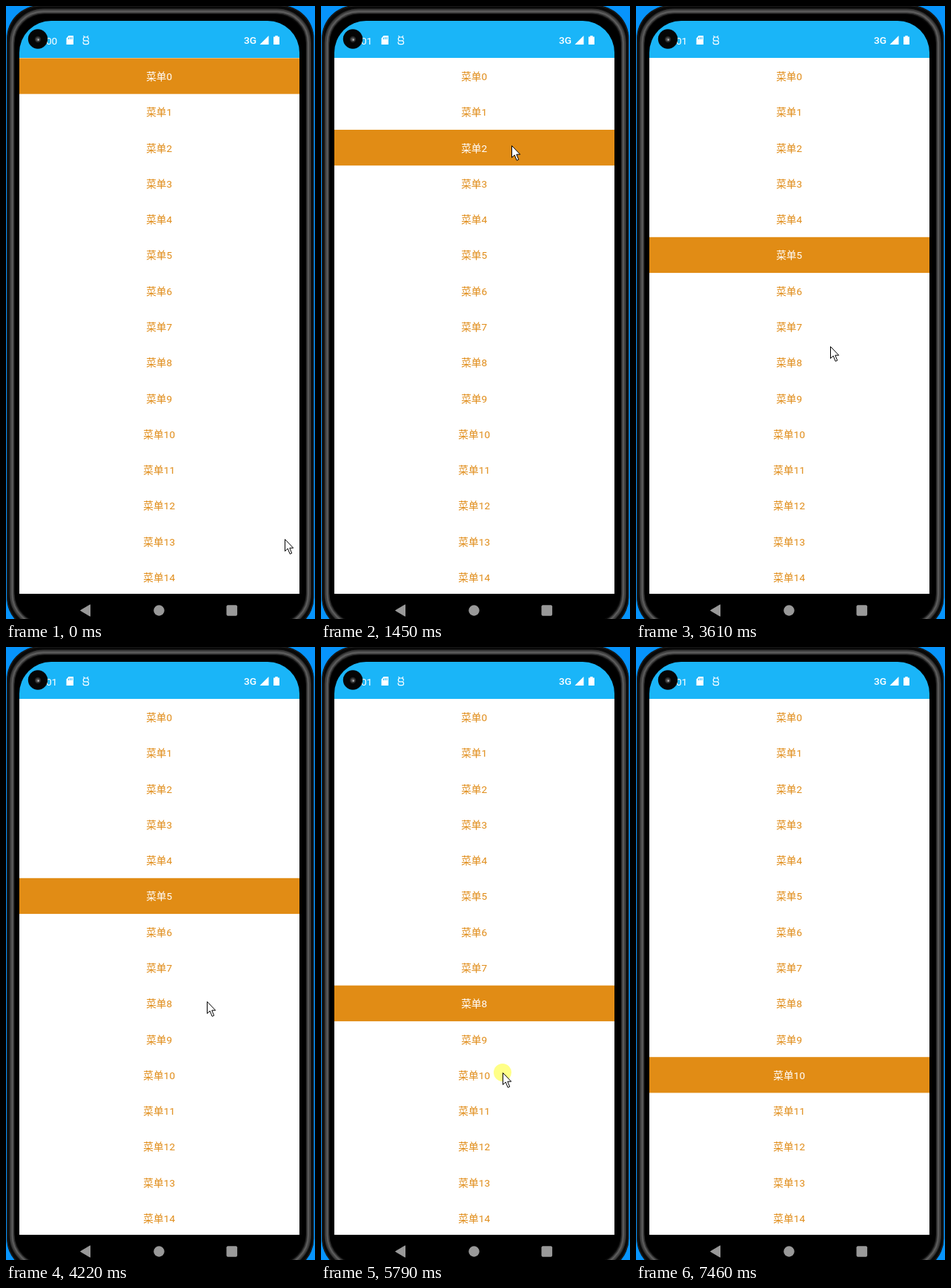
Write an HTML page that moves like this. It is 417 by 827 pixels and loops after 8.12 s.

```html
<!DOCTYPE html>
<html lang="zh">
<head>
<meta charset="utf-8">
<title>菜单</title>
<style>
  html, body { margin: 0; width: 100%; height: 100%; overflow: hidden; background: #0794fc; }
  svg { display: block; width: 417px; height: 827px; }
  text { font: 13.7px Roboto, "Noto Sans CJK SC", "Noto Sans CJK", sans-serif; }
  .row text { fill: #e08c18; text-anchor: middle; }
  .row rect { fill: none; }
  .row.on rect { fill: #e18c15; }
  .row.on text { fill: #fff; }
</style>
</head>
<body>
<svg viewBox="0 0 417 827">
  <defs>
    <clipPath id="screen"><rect x="18" y="20" width="378" height="840" rx="43"/></clipPath>
    <clipPath id="list"><rect x="18" y="70" width="378" height="723"/></clipPath>
  </defs>

  <g id="bezel" fill="none">
    <rect x="1" y="-1" width="414.5" height="844" rx="45" fill="#080808"/>
    <rect x="2" y="0" width="412.5" height="842" rx="44" stroke="#242424"/>
    <rect x="8" y="7" width="400.5" height="829" rx="43" stroke="#2b2b2b" stroke-width="7"/>
    <rect x="8" y="7" width="400.5" height="829" rx="43" stroke="#434343" stroke-width="4.5"/>
    <rect x="8.5" y="7.5" width="399.5" height="828" rx="42" stroke="#5d5d5d" stroke-width="1.8"/>
    <rect x="11.5" y="11" width="393" height="821" rx="42" fill="#000"/>
  </g>

  <g clip-path="url(#screen)">
    <rect x="18" y="20" width="378" height="50.3" fill="#1ab5f8"/>
    <rect x="18" y="70" width="378" height="723" fill="#fff"/>
  </g>

  <g id="status" fill="#fff">
    <text id="clock" x="69.3" y="51.5" text-anchor="end"></text>
    <path d="M84.5 40H91V52H81.5V43.5Z"/>
    <path d="M84.5 42.5v2.5M86.7 42v3M89 42v3" stroke="#1ab5f8"/>
    <path d="M104.5 40l1.5 2M111 40l-1.5 2M111.3 45.5v-1q0-2.5-2.5-2.5h-2q-2.5 0-2.5 2.5t2.5 2.5h2.3q2.5 0 2.5 2.3t-2.5 2.3h-2.5q-2.5 0-2.5-2.3v-1M104.3 46.8h7"
          fill="none" stroke="#fff" stroke-width="1.2"/>
    <text x="321" y="51" font-weight="500" style="font-weight:500">3G</text>
    <path d="M354.5 40V52H342.5Z"/>
    <path d="M363.3 40h3.4v1.4h2.3V52h-8V41.4h2.3Z"/>
  </g>

  <g id="camera">
    <circle cx="43" cy="44.5" r="13.2" fill="#050505"/>
    <circle cx="43" cy="45" r="4.2" fill="#252525"/>
    <circle cx="43" cy="45" r="2.6" fill="#555"/>
    <circle cx="43.6" cy="45.6" r="1.1" fill="#c4c4c4"/>
  </g>

  <g id="rows" clip-path="url(#list)"></g>

  <g id="nav" fill="#999">
    <path d="M100.5 815.5L113.5 807.8V823.2Z" stroke="#999" stroke-linejoin="round"/>
    <circle cx="206.5" cy="815.5" r="7.2"/>
    <rect x="297.5" y="808.2" width="14.6" height="14.6" rx="2"/>
  </g>

  <g id="pointer">
    <circle id="press" r="12" fill="#ff0" fill-opacity=".47"/>
    <path d="M.5.5V16.5L4.2 13L7.2 20.3L9.7 19.2L6.8 12.2H11.7Z" fill="#fff" stroke="#000"/>
  </g>
</svg>
<script>
const LOOP = 8120, STEP = 70, PITCH = 48.28;
const $ = id => document.getElementById(id);

// Pointer waypoints: [ms, x, y]
const path = [
  [0, 376, 719], [70, 330, 589], [170, 330, 589], [1040, 257, 188],
  [1510, 257, 188], [1980, 266, 266], [2710, 248, 332],
  [3190, 248, 332], [3610, 262, 459], [3890, 271, 478],
  [4550, 271, 478], [4880, 354, 577], [5090, 362, 657], [5370, 238, 592],
  [5720, 245, 574], [6190, 245, 574], [7060, 374, 767],
  [7460, 369, 828], [LOOP, 369, 828]
];
// Start and end of each visible press, and the row selected afterwards
const clicks = [
  { down: 1180, up: 1290, at: 1450, row: 2 },
  { down: 2780, up: 2910, at: 3060, row: 5 },
  { down: 4100, up: 4200, at: 4350, row: 8 },
  { down: 5740, up: 5830, at: 5980, row: 10 }
];

$('rows').innerHTML = Array.from({ length: 15 }, (_, i) => {
  const y = 70.4 + i * PITCH;
  return `<g class="row"><rect x="18" y="${y}" width="378" height="${PITCH}"/>` +
    `<text x="206.7" y="${y + 29.6}">菜单${i}</text></g>`;
}).join('');
const rows = [...$('rows').children];

function pointerAt(t) {
  const i = path.findIndex(p => p[0] > t);
  const [t0, x0, y0] = path[i - 1], [t1, x1, y1] = path[i];
  const k = Math.floor((t - t0) / STEP) * STEP / (t1 - t0);
  return [x0 + (x1 - x0) * k, y0 + (y1 - y0) * k].map(Math.round);
}

function render(t) {
  const selected = clicks.reduce((row, c) => t >= c.at ? c.row : row, 0);
  rows.forEach((row, i) => row.classList.toggle('on', i === selected));
  $('clock').textContent = t < 660 ? '00' : '01';
  $('pointer').setAttribute('transform', `translate(${pointerAt(t)})`);
  const pressed = clicks.some(c => t >= c.down && t < c.up);
  $('press').setAttribute('visibility', pressed ? 'visible' : 'hidden');
}

const start = performance.now();
function tick() {
  render((performance.now() - start) % LOOP);
  requestAnimationFrame(tick);
}
tick();
</script>
</body>
</html>
```
